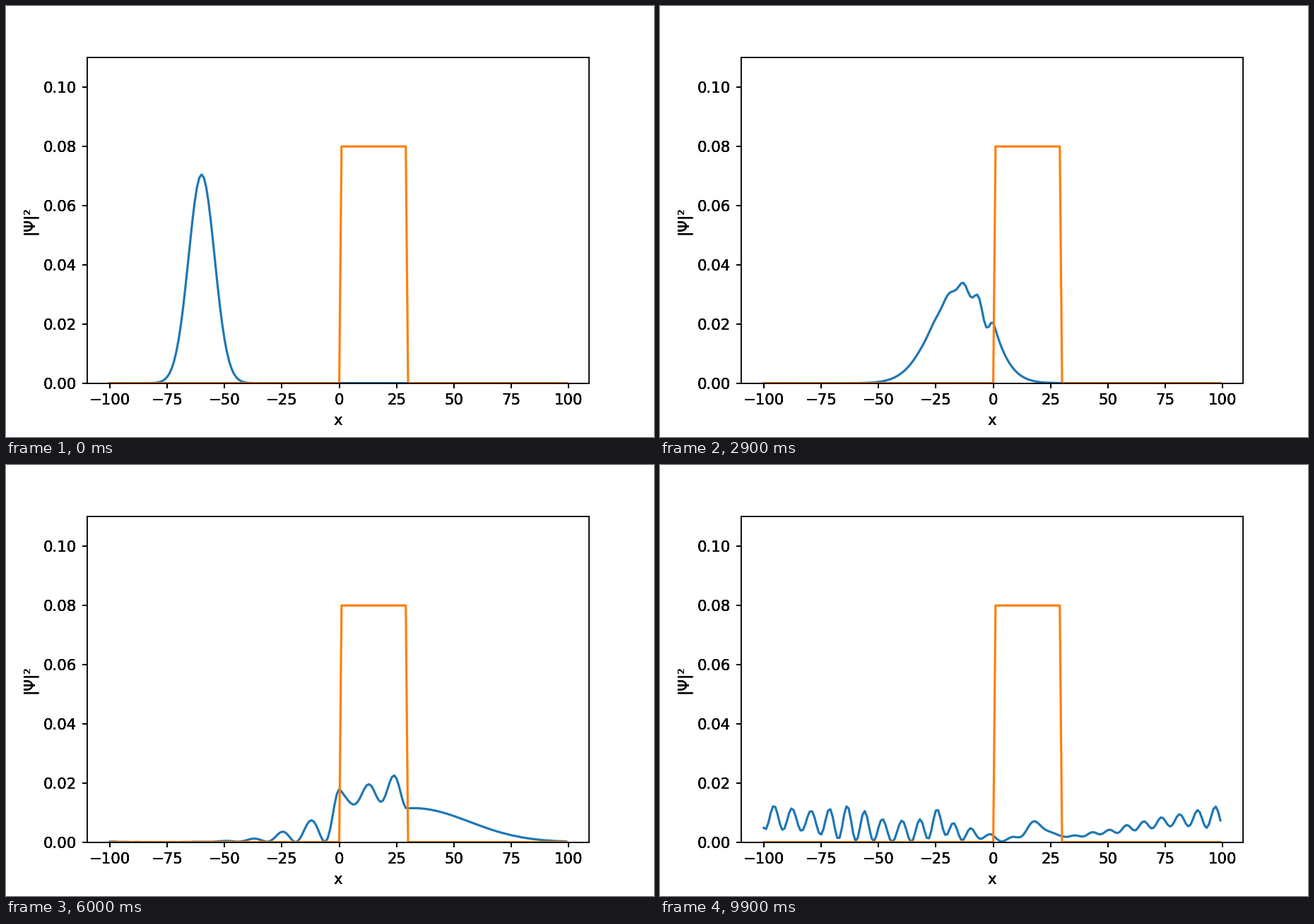
A matplotlib script for the animation above (10000 ms loop, 917 px wide and 611 px high).

```python
import numpy as np
import matplotlib.pyplot as plt
from matplotlib.animation import FuncAnimation

# Gaussian wave packet meeting a square barrier on a periodic grid,
# with hbar = 1 and m = 1/2, so H = p^2 + V.
N = 200
FRAMES = 100
DT = 2.1
X0, WIDTH, K0 = -60, 8, 2 * np.pi * 12 / N
BOX = (0.125, 0.125, 0.775, 0.755)
UNDERLAYS = 3

x = np.arange(-N // 2, N // 2)
V = np.where((x > 0) & (x < 30), 0.08, 0.0)

# Hamiltonian with a spectral kinetic term
k = 2 * np.pi * np.fft.fftfreq(N)
kinetic = np.fft.ifft(k[:, None] ** 2 * np.fft.fft(np.eye(N), axis=0), axis=0).real
H = (kinetic + kinetic.T) / 2 + np.diag(V)
energy, modes = np.linalg.eigh(H)

psi0 = np.exp(-((x - X0) / WIDTH) ** 2 / 2 + 1j * K0 * x)
psi0 /= np.linalg.norm(psi0)
coeffs = modes.T @ psi0


def density(t):
    return np.abs(modes @ (np.exp(-1j * energy * t) * coeffs)) ** 2


def add_axes(fig, label):
    ax = fig.add_axes(BOX, label=label)
    ax.set_xlim(-109.95, 108.95)
    ax.set_ylim(0, 0.11)
    ax.set_xlabel("x")
    ax.set_ylabel("|Ψ|²")
    return ax


plt.rcParams["font.family"] = "DejaVu Sans"
fig = plt.figure(figsize=(6.00328, 4), dpi=152.75)

# Stacked copies darken the soft edges of labels, ticks and frame
for i in range(UNDERLAYS):
    add_axes(fig, f"under{i}")
ax = add_axes(fig, "main")

wave, = ax.plot(x, density(0))
ax.plot(x, V)


def update(i):
    wave.set_ydata(density(DT * i))
    return wave,


anim = FuncAnimation(fig, update, frames=FRAMES, interval=100,
                     repeat=True, repeat_delay=0)
plt.show()
```
